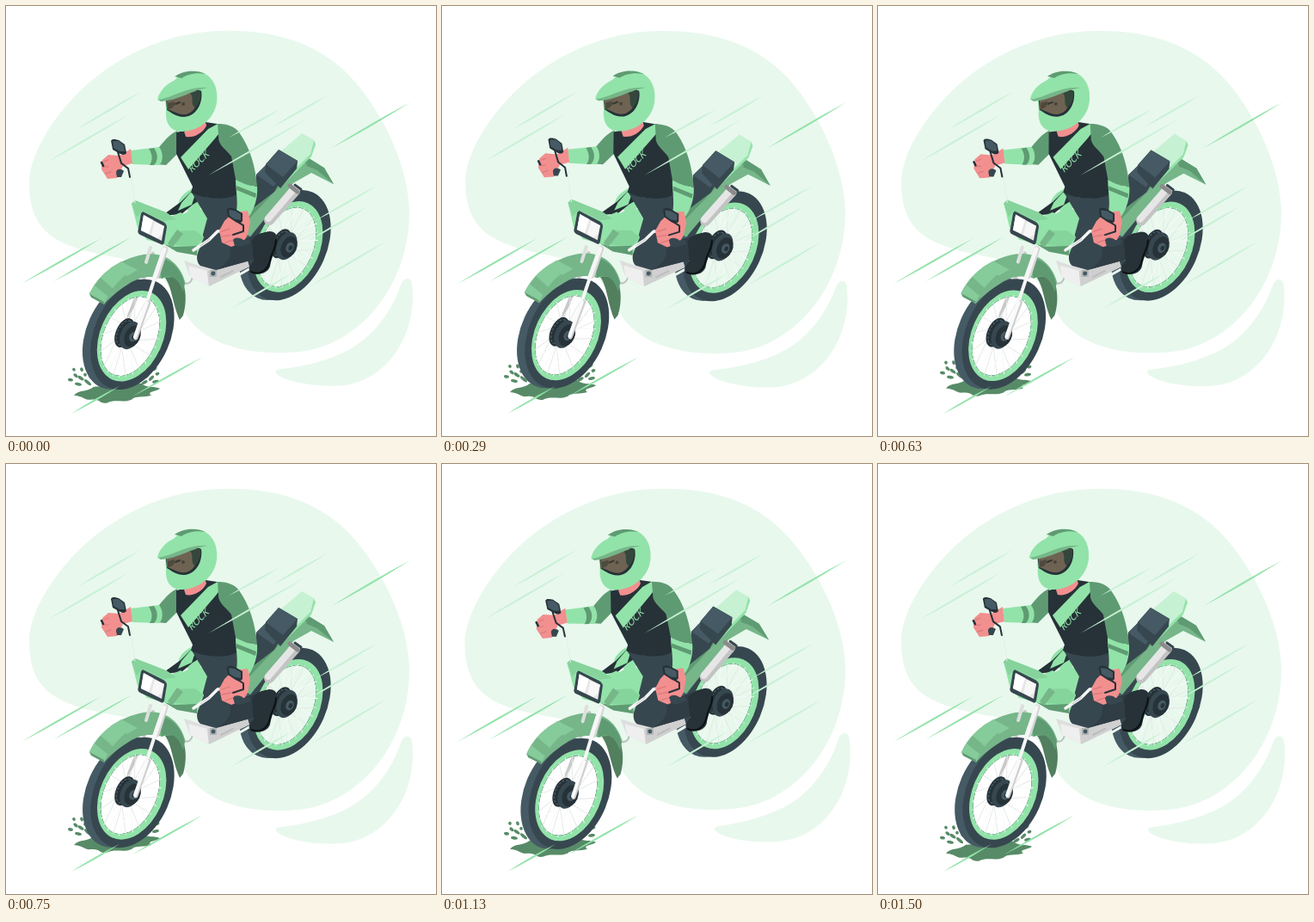
These frames come from a looping animation (500 by 500 pixels, 1.54 s). An HTML page:

```html
<!DOCTYPE html>
<html lang="en">
<head>
<meta charset="utf-8">
<title>Motorbike ride</title>
<style>
html, body { margin: 0; width: 100%; height: 100%; overflow: hidden; background: #fff; }
svg { display: block; width: 100vw; height: 100vh; }
</style>
</head>
<body>
<svg viewBox="0 0 500 500">
  <g id="blob" fill="#e8f8ed"></g>
  <g id="dirt" fill="#578b67"></g>
  <g id="bike" stroke-linecap="round" stroke-linejoin="round"></g>
  <g id="wind"></g>
</svg>
<script>
const NS = 'http://www.w3.org/2000/svg';
const GREEN = '#92e3a9', MID = '#76b689', DEEP = '#5f9b72', SHADE = '#527f5e', PALE = '#c7f1d3';
const INK = '#263238', NAVY = '#37474f', SLATE = '#455a64', SKIN = '#f28f8f';
const GREY = '#dedede', WHITE = '#f6f6f6';
const blob = document.getElementById('blob');
const dirt = document.getElementById('dirt');
const bike = document.getElementById('bike');
const wind = document.getElementById('wind');

function add(parent, tag, attrs) {
  const el = document.createElementNS(NS, tag);
  for (const k in attrs) el.setAttribute(k, attrs[k]);
  parent.appendChild(el);
  return el;
}
const fill = (d, color) => add(bike, 'path', { d, fill: color });
const line = (d, color, width) =>
  add(bike, 'path', { d, fill: 'none', stroke: color, 'stroke-width': width });

const TILT = 24;
const oval = (cx, cy, a, b) =>
  `M${cx},${cy - a}a${b},${a} 0 1 1 0,${2 * a}a${b},${a} 0 1 1 0,${-2 * a}Z`;

function wheel(cx, cy) {
  const g = add(bike, 'g', { transform: `translate(${cx} ${cy}) rotate(${TILT})` });
  const shape = (d, color) => add(g, 'path', { d, fill: color, 'fill-rule': 'evenodd' });
  const hole = oval(-1.5, 3, 48.5, 30.5);
  shape(oval(-8.6, 3.5, 67.5, 44) + hole, SLATE);
  shape(oval(0, 0, 67.5, 44) + hole, NAVY);
  shape(oval(0, 2, 55.5, 36.5) + hole, GREEN);
  // crossed spokes
  for (let i = 0; i < 28; i++) {
    const u = i * Math.PI / 14, v = u + (i % 2 ? 0.5 : -0.5);
    const x = i % 4 < 2 ? -8 : -2;
    add(g, 'path', {
      d: `M${x + 8 * Math.cos(v)},${2 + 11 * Math.sin(v)}L${32.5 * Math.cos(u) - 1},${50 * Math.sin(u) + 3}`,
      stroke: i % 2 ? '#e3e8e5' : '#f7f9f8', 'stroke-width': 0.9
    });
  }
  shape(oval(-9, 2, 18, 10), INK);
  add(g, 'path', { d: oval(-9, 2, 15, 8), fill: 'none', stroke: SLATE, 'stroke-width': 1.5,
    'stroke-dasharray': '1.5 3' });
  shape(oval(-2, 2, 17, 11), NAVY);
  shape(oval(1, 2, 13, 9), INK);
  shape(oval(2, 2, 6, 4.5), SLATE);
  shape(oval(3, 2, 3, 2.2), INK);
}

function drawBlob() {
  add(blob, 'path', { d: 'M27,208C26,165 72,103 119,72C161,44 205,30 250,29C311,27 366,43 404,86C442,129 469,192 469,240C469,302 437,362 384,389C358,402 337,403 311,403C264,402 225,387 207,355C190,325 177,301 142,295C104,288 67,282 46,262C32,248 27,229 27,208Z' });
  add(blob, 'path', { d: 'M314,426C320,438 375,446 403,439C450,427 479,375 472,322C470,315 464,315 460,322C450,351 430,385 392,403C365,415 340,420 320,422C315,423 313,424 314,426Z' });
}

function drawDirt() {
  add(dirt, 'path', { d: 'M79,453C85,446 96,449 102,443L157,439C163,445 174,442 179,445C175,449 163,448 169,453C161,456 150,453 146,458C137,462 126,457 117,462C108,463 110,457 99,458C91,459 91,454 79,453Z' });
  const drops = [[75, 435, 3, 10], [81, 430, 3, 40], [79, 423, 2, 55], [88, 423, 2.5, 70],
    [87, 433, 4, 35], [95, 438, 5, 40], [84, 440, 4, 10], [92, 429, 2, 60], [98, 431, 3, 65],
    [164, 430, 4, -55], [173, 422, 3, -45], [176, 428, 2.5, -20], [169, 433, 4, -45],
    [174, 437, 4, -10], [161, 438, 4, -30], [166, 423, 2, -60]];
  for (const [x, y, r, a] of drops)
    add(dirt, 'ellipse', { rx: r, ry: 1.8, transform: `translate(${x} ${y}) rotate(${a})` });
}

function drawRear() {
  wheel(329, 278);
  // tail and side panel
  fill('M341,184L352,177L370,188L381,207L355,194L332,207Z', MID);
  fill('M341,184L352,177L370,188L381,207L362,191L350,186Z', DEEP);
  fill('M268,258L290,226L318,206L344,180L350,184L326,217L284,268Z', MID);
  fill('M284,246L316,212L318,206L291,228L276,250Z', DEEP);
  fill('M316,172L344,148L358,156L354,172L338,190L318,208Z', PALE);
  fill('M354,172L358,156L360,161L355,175L318,212L318,208Z', GREEN);
  // seat
  fill('M291,196L303,184L322,198L312,216L286,236Z', NAVY);
  fill('M291,196L303,184L322,198L311,210Z', SLATE);
  fill('M302,184L317,167L339,180L338,189L319,212L301,193Z', NAVY);
  fill('M302,184L317,167L339,180L322,199Z', SLATE);
  // silencer
  line('M306,249L336,215', '#c3c3c3', 12);
  line('M305,247L334,213', '#e6e6e6', 8);
  line('M330,209L339,216', '#8b8b8b', 5);
  line('M336,208L343,213', NAVY, 3);
}

function drawEngine() {
  line('M197,289C194,313 214,331 237,332L286,304', '#edf5ef', 3);
  line('M203,317C207,326 216,324 217,314', '#b9c2bd', 2);
  fill('M207,296L225,302L280,293L283,303L236,326L214,315Z', GREY);
  fill('M212,302L234,308L236,326L214,315Z', '#efefef');
  fill('M234,308L280,297L283,303L236,326Z', '#d0d0d0');
  fill('M237,307h8v8h-8Z', '#aeb4b4');
  add(bike, 'circle', { cx: 241, cy: 311, r: 2.5, fill: SLATE });
  line('M250,315L264,308', '#bdbdbd', 2);
}

function drawRider() {
  // left arm
  fill('M199,145C190,149 185,156 178,164L174,184L186,185L201,170Z', DEEP);
  fill('M145,168L178,164C183,170 183,181 178,185L147,184Z', GREEN);
  fill('M166,166L172,165C177,172 177,180 172,185L167,185C171,179 170,172 166,166Z', DEEP);
  // left leg
  fill('M217,212C207,217 201,223 200,232L216,240L232,232L228,218Z', GREEN);
  fill('M217,214L203,228L181,244L204,242L217,231L232,222Z', INK);
  fill('M217,214L204,229L200,238L216,231L220,219Z', GREEN);
  // tank
  fill('M186,246L206,242L222,233L236,243L242,260L228,278L196,270Z', GREEN);
  // right leg
  fill('M216,217C235,225 253,225 269,218L274,246L258,274L281,270L298,264L298,292L244,307L226,302C219,296 223,282 227,273L234,247Z', NAVY);
  fill('M258,274L281,270L298,264L298,292L244,307C262,298 264,286 258,274Z', '#303d45');
  // boot
  fill('M286,273C290,265 301,263 306,262C313,262 316,266 315,274C314,285 309,290 307,303C304,312 292,313 285,310C280,306 284,301 288,296Z', INK);
  line('M285,309C296,314 305,306 307,296C309,285 314,283 314,272', '#0c1114', 2);
  // torso
  fill('M198,147L215,143L232,135L252,138L266,165L269,219C254,227 230,224 215,217L217,210L198,172Z', INK);
  fill('M207,146L231,132L233,139C229,148 217,154 209,152Z', SKIN);
  fill('M203,176L235,143L246,137L251,144L243,154L212,190Z', GREEN);
  // right arm
  fill('M246,137C257,137 266,140 271,147C284,165 290,187 292,210L268,207L262,175C256,167 246,161 247,152Z', DEEP);
  fill('M267,202C276,207 286,210 292,210C293,222 289,237 282,245L268,239C270,226 267,214 267,202Z', GREEN);
  fill('M268,209L291,218L290,223L268,214Z', DEEP);
  add(bike, 'text', { x: 0, y: 0, transform: 'translate(216 194) rotate(-45) skewX(-10)',
    fill: GREEN, 'font-size': 11.5, 'font-style': 'italic',
    'font-family': 'Lato, sans-serif' }).textContent = 'ROCK';
}

function drawHelmet() {
  fill('M185,108C190,85 207,74 223,76C240,79 247,95 245,111C243,130 226,145 205,146C191,146 185,137 186,121Z', GREEN);
  fill('M186,110L220,96L227,99C229,112 222,128 207,129C197,129 191,123 187,121Z', INK);
  fill('M187,110L219,97C226,104 223,120 212,125C203,129 196,122 187,120Z', '#6e6353');
  fill('M214,101L226,98C227,107 225,114 219,118C214,113 219,107 214,101Z', '#34473c');
  fill('M188,113L196,111C197,116 193,120 188,120Z', '#4d4a3e');
  line('M197,114L202,112', '#38372f', 2);
  add(bike, 'circle', { cx: 206, cy: 114, r: 2, fill: '#4a4438' });
  fill('M176,109C179,94 196,82 214,83C224,83 231,88 234,95C214,95 199,107 180,111Z', GREEN);
  fill('M177,109C193,107 211,93 234,95C216,98 200,110 180,111Z', MID);
  fill('M196,82C204,76 218,73 232,79C219,77 210,80 204,84Z', DEEP);
}

function drawFront() {
  fill('M176,308C194,318 191,340 202,365L206,360C213,337 207,312 192,300Z', SHADE);
  line('M171,288L157,325L139,370', '#c9c9c9', 4);
  wheel(147, 382);
  // mudguard
  fill('M97,335C108,311 132,294 160,289C186,285 203,300 209,323C202,314 190,314 181,317C168,313 155,315 143,323C130,331 121,339 114,347Z', MID);
  fill('M97,335C104,320 115,308 128,301L143,310C130,319 120,332 114,347Z', '#86cb9a');
  fill('M103,325L110,316L125,329L119,338Z', MID);
  fill('M121,305L134,297L153,307L141,314Z', '#86cb9a');
  fill('M97,335L114,344L114,347L99,339Z', DEEP);
  fill('M181,317C190,312 200,314 206,333L208,323C202,302 190,294 177,293Z', DEEP);
  // fork
  line('M185,283L175,314', '#d5d5d5', 7);
  line('M184,283L173,315', WHITE, 5);
  line('M173,316L163,347', WHITE, 4);
  line('M166,345L151,386', '#cfcfcf', 5);
  line('M164,345L150,385', '#fafafa', 4);
  line('M168,281L163,298', GREY, 4);
  // fairing
  fill('M184,248L203,240L222,251L230,269L222,290L196,284L184,277Z', GREEN);
  fill('M190,262L220,261L230,269L221,280L196,278Z', '#84d49c');
  fill('M184,277L196,280L222,279L222,290L199,286Z', DEEP);
  fill('M146,230L150,226L186,240L198,248L199,260L188,278L164,272L153,258Z', GREEN);
  fill('M146,230L150,226L186,240L198,248L184,250L158,238L152,246Z', '#86d39c');
  fill('M188,276L199,260L206,265L193,281Z', MID);
  // headlight
  fill('M159,239L183,251C186,253 187,255 187,257L184,275C183,278 182,278 180,277L156,266C153,264 153,262 154,259L157,241Z', NAVY);
  fill('M160,243L184,256L181,273L157,261Z', '#e6e6e6');
  fill('M160,243L171,249L166,265L157,261Z', '#fff');
  fill('M173,251L184,256L181,266L176,270L169,266Z', '#f7f7f7');
}

function drawBars() {
  // left side
  line('M146,193C145,206 149,216 150,229', '#e8ece9', 1);
  fill('M145,166L147,183L136,186L129,200L118,201L111,190L112,179L119,173L132,174Z', SKIN);
  line('M114,181L119,179M112,187L119,187M116,195L122,193', '#d87a7e', 1.2);
  line('M111,182L113,186', INK, 2.5);
  line('M130,170L134,183L142,189L144,199', INK, 2);
  fill('M128,194C128,189 134,189 137,192L134,199L129,199Z', NAVY);
  fill('M122,157C123,154 127,155 131,156L138,161L140,171C138,174 134,173 131,171L124,167Z', INK);
  fill('M124,157L131,157L137,162L138,169L132,169L125,165Z', SLATE);
  // right side
  line('M218,284L236,272L246,262L260,260', WHITE, 3.5);
  line('M226,279L237,271', '#cacaca', 1);
  fill('M264,240L281,238L284,251L281,266L276,275L262,280L251,275L248,261L254,250Z', SKIN);
  line('M251,262L260,259M251,268L262,266M255,275L264,272', '#d87a7e', 1.3);
  line('M268,250L276,255L276,262L264,266', INK, 2);
  fill('M264,272C266,268 273,269 276,272L283,271L284,276L273,280L266,279Z', NAVY);
  fill('M257,238C256,234 261,234 266,236L275,241L275,250C272,254 268,252 264,249L258,245Z', INK);
  fill('M259,237L266,238L273,242L273,249L266,248L260,244Z', SLATE);
}

function streak(x1, y1, x2, y2, color) {
  const len = Math.hypot(x2 - x1, y2 - y1), w = 2.2;
  const nx = (y1 - y2) / len * w, ny = (x2 - x1) / len * w;
  const mx = (x1 + x2) / 2, my = (y1 + y2) / 2;
  add(wind, 'path', { fill: color,
    d: `M${x1},${y1}Q${mx + nx},${my + ny} ${x2},${y2}Q${mx - nx},${my - ny} ${x1},${y1}Z` });
}

function drawWind() {
  const strong = [[378, 165.5, 470, 112], [18, 323, 111, 270], [55, 320.5, 147, 268],
    [76, 474, 132, 442], [147, 454, 229, 408]];
  const soft = [[81, 144, 158, 99], [47, 182, 145, 125], [259, 153, 319, 120], [235, 197, 350, 131],
    [309, 141, 374, 104], [359, 250, 433, 208], [350, 274, 421, 233], [353, 326, 443, 273],
    [260, 353, 334, 310]];
  strong.forEach(s => streak(...s, GREEN));
  soft.forEach(s => streak(...s, PALE));
}

drawBlob();
drawDirt();
drawRear();
drawEngine();
drawRider();
drawHelmet();
drawFront();
drawBars();
drawWind();

const LOOP = 1540, STEPS = 37;

// 0 at the start, 1 at a quarter, -1 at three quarters, 0 at the end
const sway = p => p < 0.25 ? 4 * p : p < 0.75 ? 2 - 4 * p : 4 * p - 4;

function render(ms) {
  // 24 poses per second, each taken at the middle of its step
  const n = Math.floor((ms % LOOP + 5) / LOOP * STEPS) % STEPS;
  const p = (n + 0.5) / STEPS, angle = sway(p);
  const lift = -10 * (1 - Math.abs(2 * p - 1));
  blob.setAttribute('transform', `rotate(${angle} 250 236)`);
  bike.setAttribute('transform', `rotate(${angle} 235 262)`);
  dirt.setAttribute('transform', `translate(0 ${lift})`);
}

const start = performance.now();
function tick() {
  render(performance.now() - start);
  requestAnimationFrame(tick);
}
tick();
</script>
</body>
</html>
```
